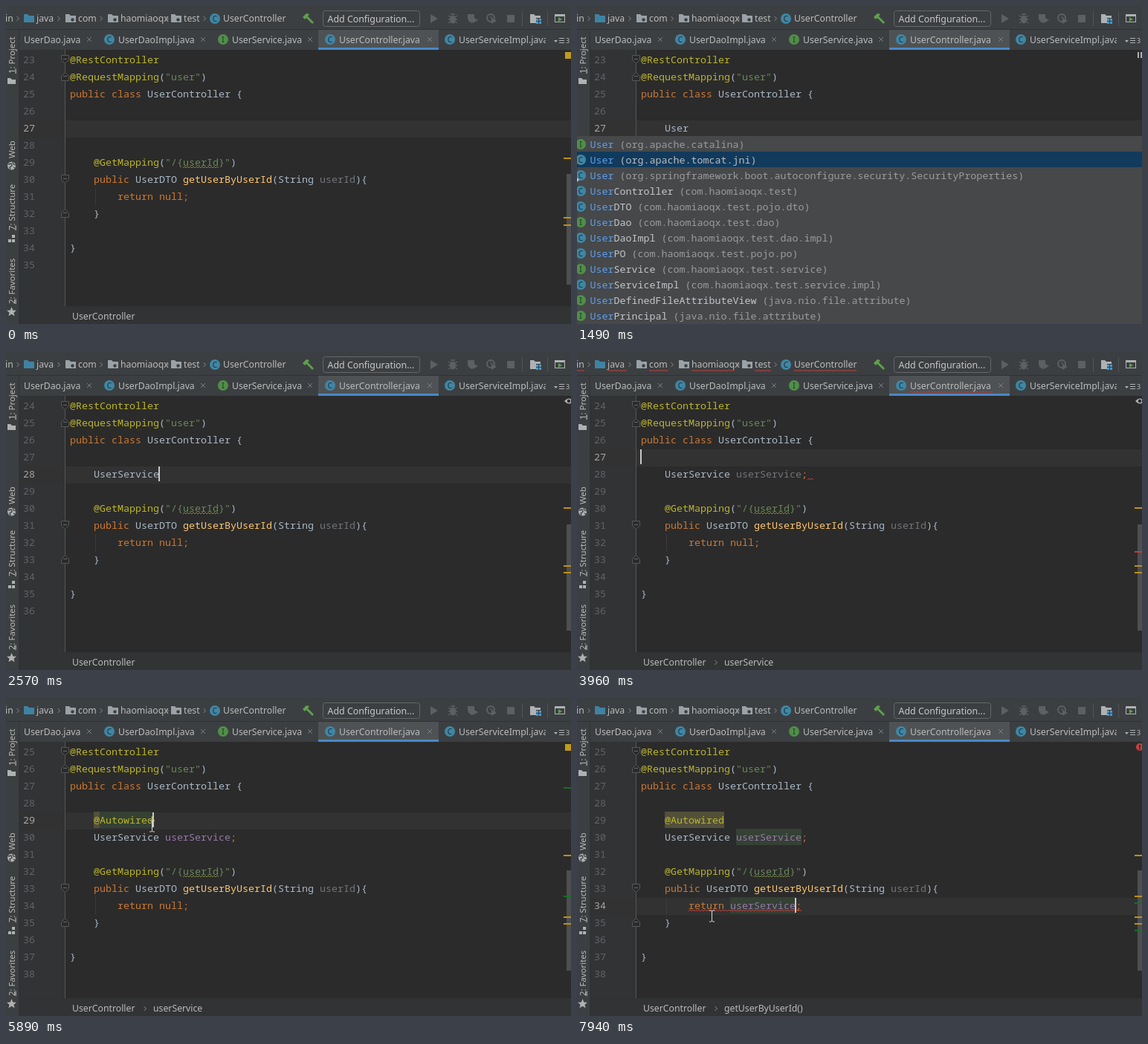
An HTML page that plays this animation: 760 px wide and 428 px high, repeating every 8000 ms.

```html
<!DOCTYPE html>
<html lang="en">
<head>
<meta charset="utf-8">
<title>Code editor</title>
<style>
html, body { margin: 0; width: 100%; height: 100%; overflow: hidden; background: #2b2b2b; }
svg { display: block; width: 760px; height: 428px; }
text { white-space: pre; }
.code { font: 13.33px "Noto Sans Mono", "DejaVu Sans Mono", monospace; }
.ui { font: 12.25px "Noto Sans", "Open Sans", sans-serif; }
</style>
</head>
<body>
<svg viewBox="0 0 760 428" xmlns="http://www.w3.org/2000/svg">
  <g id="editor"></g>
  <g id="chrome"></g>
  <g id="overlay"></g>
  <path id="mouse" d="M-3.5-7.5h2.5l1 1 1-1h2.5M0-6.5v13M-3.5 7.5h2.5l1-1 1 1h2.5" fill="none" stroke="#d8d8d8"/>
</svg>
<script>
const LOOP = 8000, CH = 8, ROW = 23, LEFT = 86, TOP = 61;
const C = {
  bar: '#3c3f41', text: '#a9b7c6', ui: '#bbbbbb', key: '#cc7832', note: '#bbb529', str: '#6a8759',
  fn: '#ffc66d', field: '#9876aa', dim: '#72737a', red: '#bc3f3c', warn: '#be9117', use: '#1c6b2b',
  usage: '#344134', ochre: '#52503a', pick: '#214283'
};
const $ = id => document.getElementById(id);

const rect = (x, y, w, h, fill, more = '') => `<rect x="${x}" y="${y}" width="${w}" height="${h}" fill="${fill}" ${more}/>`;
const shape = (d, fill, more = '') => `<path d="${d}" fill="${fill}" ${more}/>`;
const line = (d, color, w = 1) => shape(d, 'none', `stroke="${color}" stroke-width="${w}"`);
const label = (x, y, s, fill = C.ui, more = '') => `<text class="ui" x="${x}" y="${y}" fill="${fill}" ${more}>${s}</text>`;
const mono = (x, y, s, fill) => `<text class="code" x="${x}" y="${y}" fill="${fill}">${s}</text>`;
const wave = (x1, x2, y, color) => {
  let d = `M${x1} ${y}`;
  for (let x = x1, up = true; x + 2 <= x2; x += 2, up = !up) d += up ? 'l2-2' : 'l2 2';
  return line(d, color);
};
const badge = (x, y, letter) => `<circle cx="${x}" cy="${y}" r="7" fill="${letter === 'C' ? '#3f86a5' : '#4f8f47'}"/>` +
  `<text x="${x}" y="${y + 3.5}" text-anchor="middle" font-family="Noto Sans, sans-serif" font-size="10" fill="#1f2d33">${letter}</text>`;
const folder = (x, color, dot) => shape(`M${x} 11h5l2 2h7v9h-14z`, color) +
  (dot ? `<circle cx="${x + 9.5}" cy="18.5" r="2.2" fill="#3c3f41"/>` : '');
const chevron = (x, y) => line(`M${x - 1.5} ${y - 3}l3 3-3 3`, '#85888a');

// Fixed window parts

function toolbar() {
  const crumbs = [[41, 'java'], [97, 'com'], [154, 'haomiaoqx'], [239, 'test'], [292, 'UserController']];
  let s = rect(0, 0, 760, 59, C.bar) + rect(0, 31, 760, 1, '#323232') + label(-1, 21, 'in');
  crumbs.forEach(([x, t], i) => {
    s += label(x, 21, t);
    if (i < 4) s += folder(x - 17, i ? '#9aa2a8' : '#3e83a3', i);
  });
  s += [16, 71, 128, 217, 267].map(x => chevron(x, 17)).join('') + badge(281, 17, 'C');
  s += shape('M399 15l5-5 4 1-2 3 8 8-2 2-8-8-2 2z', '#5fa04e');
  s += rect(426.5, 6.5, 130, 21, C.bar, 'rx="3" stroke="#646769"');
  s += label(432.5, 22, 'Add Configuration...', '#c8c8c8', 'style="font-size:12.4px"');
  const off = '#5d6062';
  s += shape('M571 11l10 6-10 6z', off);
  s += `<ellipse cx="601" cy="18" rx="4" ry="5.5" fill="${off}"/>` + line('M595 13l3 2M595 18h12M595 23l3-2M607 13l-3 2M607 23l-3-2M598 11l6 0', off, 1.4);
  s += shape('M621 11h9v6l-3 6q-6-2-6-7z', off) + shape('M628 15l7 4-7 4z', off);
  s += `<circle cx="652" cy="16" r="5" fill="none" stroke="${off}" stroke-width="2"/>` + line('M652 13v3h3', off) + shape('M653 16l7 4-7 4z', off);
  s += rect(674, 12, 10, 10, off) + rect(694, 7, 1, 20, '#515456') + rect(728, 7, 1, 20, '#515456');
  s += shape('M705 11h5l2 2h7v3h-6v7h-8z', '#afb1b3');
  for (const [x, y] of [[713, 17], [717, 17], [713, 21], [717, 21]]) s += rect(x, y, 3, 3, '#4a9ad0');
  s += rect(738.5, 11.5, 13, 10, 'none', 'stroke="#afb1b3"') + rect(738, 11, 14, 3, '#afb1b3') + shape('M743 15l5 3-5 3z', '#5fa04e');
  return s;
}

function tabs() {
  const list = [[24, 'UserDao', '', 112], [151, 'UserDaoImpl', 'C', 265], [304, 'UserService', 'I', 409],
    [448, 'UserController', 'C', 570], [609, 'UserServiceImpl', 'C', 0]];
  let s = rect(420, 32, 162, 27, '#4e5254') + rect(420, 56, 162, 3, '#4a88c7');
  for (const [x, name, kind, close] of list) {
    s += label(x, 50, name + '.java');
    if (kind) s += badge(x - 12, 45, kind);
    if (close) s += line(`M${close - 3} 42l6 6m0-6l-6 6`, '#7a7d7f');
  }
  s += rect(726, 32, 34, 27, C.bar) + shape('M737 46h5l-2.5 3z', '#afb1b3') + line('M744 43.5h7M744 46.5h7M744 49.5h7', '#afb1b3');
  return s + label(753, 50, '3', C.ui, 'style="font-size:9px"');
}

function sidebar() {
  const side = (y, t) => `<text class="ui" transform="translate(11.5 ${y}) rotate(-90)" fill="#bbbbbb" style="font-size:11.4px">${
    t.includes(':') ? `<tspan text-decoration="underline">${t[0]}</tspan>${t.slice(1)}` : t}</text>`;
  let s = rect(0, 32, 17, 396, C.bar) + rect(17, 32, 1, 396, '#323232');
  s += side(91, '1: Project') + side(205, 'Web') + side(302, '7: Structure') + side(401, '2: Favorites');
  s += shape('M2 97h4l2 2h5v6h-11z', '#afb1b3');
  s += '<circle cx="7.5" cy="215" r="5.5" fill="#afb1b3"/>' + line('M3 213l4-1 1 3-3 2 1 3M9 210l1 3 3 1M10 217l2 1', '#3c3f41', 1.3);
  s += rect(8, 308, 4, 4, '#afb1b3') + rect(3, 314, 4, 4, '#afb1b3') + rect(8, 314, 4, 4, '#afb1b3');
  return s + shape('M7.5 405l1.8 4.4 4.7.3-3.6 3 1.2 4.6-4.1-2.5-4.1 2.5 1.2-4.6-3.6-3 4.7-.3z', '#afb1b3');
}

// Completion lists: icon, name, package, nested flag

const P = 'com.haomiaoqx.test', BOOT = 'org.springframework.boot.autoconfigure';
const types = [
  ['I', 'User', 'org.apache.catalina'], ['C', 'User', 'org.apache.tomcat.jni'],
  ['C', 'User', BOOT + '.security.SecurityProperties', true], ['C', 'UserController', P],
  ['C', 'UserDTO', P + '.pojo.dto'], ['I', 'UserDao', P + '.dao'], ['C', 'UserDaoImpl', P + '.dao.impl'],
  ['C', 'UserPO', P + '.pojo.po'], ['I', 'UserService', P + '.service'], ['C', 'UserServiceImpl', P + '.service.impl'],
  ['I', 'UserDefinedFileAttributeView', 'java.nio.file.attribute'], ['I', 'UserPrincipal', 'java.nio.file.attribute']
];
const notes = [
  ['Autowired', 'org.springframework.beans.factory.annotation'], ['AutoConfigureOrder', BOOT],
  ['AutoConfigurationPackage', BOOT], ['AutoConfigureAfter', BOOT], ['AutoConfigureBefore', BOOT],
  ['AutoLoad', 'com.alibaba.druid.filter'], ['EnableAutoConfiguration', BOOT], ['ImportAutoConfiguration', BOOT],
  ['JsonAutoDetect', 'com.fasterxml.jackson.annotation'], ['NoAutoStart', 'ch.qos.logback.core.joran.spi'],
  ['EnableAspectJAutoProxy', 'org.springframework.context.annotation'], ['Default', 'lombok.Builder', true]
].map(n => ['@', ...n]);
const names = [['', 'userService', ''], ['', 'service', '']];

function popup({ x, list, match, sel = 0 }) {
  let s = rect(x, 175, 760 - x, list.length * 21 + 2, '#46484a');
  list.forEach(([kind, name, pack, nested], i) => {
    const y = 186 + i * 21, tx = x + 27.5;
    if (i === sel) s += rect(x, y - 11, 760 - x, 21, sel ? '#113a5c' : '#55585a');
    if (kind) s += badge(x + 15, y, kind);
    if (nested) s += shape(`M${x + 10} ${y + 3}l3 3-3 3-3-3z`, '#c3c6c9');
    let from = name.indexOf(match);
    if (from < 0) from = name.toLowerCase().indexOf(match.toLowerCase());
    const to = from < 0 ? 0 : from + match.length;
    from = Math.max(from, 0);
    const part = (a, b, color) => a < b ? mono(tx + a * CH, y + 5, name.slice(a, b), color) : '';
    s += part(0, from, '#c3c6c9') + part(from, to, '#5c9ff0') + part(to, name.length, '#c3c6c9');
    if (pack) s += mono(tx + (name.length + 1) * CH, y + 5, `(${pack})`, i === sel && sel ? '#bbbdbf' : '#999c9e');
  });
  return s;
}

// Timeline: each step overrides part of the state

const at = (x, list, match, sel) => ({ x, list, match, sel });
const svc = '    UserService userService;';
const calm = [['warn', 210], ['warn', 288], ['warn', 297]];
const base = [['warn', 212], ['warn', 295], ['warn', 304]];
const used = [...base, ['warn', 267], ['use', 276]];
const steps = [
  [0, { top: 23, mid: [''], cur: 4, caret: -1, status: 'warn', bar: [226, 375], marks: [['warn', 205], ['warn', 285], ['warn', 295]],
    crumb: '', pop: null, errors: 0, field: C.dim, bgs: [], ret: 'null' }],
  [70, { mid: ['    U'], caret: 5, status: 'busy' }],
  [210, { pop: at(90, types, 'U') }],
  [350, { mid: ['    Us'], caret: 6, pop: at(-10, types, 'Us') }],
  [490, { mid: ['    Use'], caret: 7, pop: at(-10, types, 'Use') }],
  [620, { mid: ['    User'], caret: 8, pop: at(-10, types, 'User') }],
  [1490, { caret: -1, pop: at(-10, types, 'User', 1) }],
  [1630, { pop: at(-10, types, 'User', 3) }],
  [1760, { pop: at(-10, types, 'User', 5) }],
  [1890, { pop: at(-10, types, 'User', 7) }],
  [2230, { pop: at(-10, types, 'User', 8) }],
  [2570, { top: 24, mid: ['    UserService'], caret: 15, status: 'eye', bar: [232, 375], marks: calm, pop: null }],
  [2840, { mid: ['    UserService '], caret: 16 }],
  [3030, { errors: 1, marks: [...calm, ['red', 269]] }],
  [3360, { mid: ['    UserService u'], caret: 17, crumb: 'u', pop: at(186, names, 'u') }],
  [3620, { mid: ['    UserService userService'], caret: 27, crumb: 'userService', pop: null }],
  [3690, { mid: [svc], caret: 28 }],
  [3960, { cur: 3, caret: 0 }],
  [4160, { mid: ['', svc], cur: 4, caret: 4, crumb: '' }],
  [4230, { errors: 0, marks: calm }],
  [4570, { mid: ['    @', svc], caret: 5, status: 'busy' }],
  [4700, { pop: at(98, notes, '') }],
  [4970, { mid: ['    @A', svc], caret: 6, pop: at(98, notes, 'A') }],
  [5100, { mid: ['    @Au', svc], caret: 7, pop: at(98, notes, 'Au') }],
  [5430, { top: 25, mid: ['    @Autowired', svc], caret: 14, crumb: 'userService', pop: null, status: 'eye', bar: [232, 367], marks: base, field: C.field }],
  [5820, { status: 'warn', marks: [...base, ['use', 121], ['use', 267]], bgs: [[4, 4, 1, C.ochre], [4, 5, 9, C.usage]] }],
  [6810, { cur: 5, caret: 27, marks: used, bgs: [[4, 4, 10, C.ochre], [5, 16, 11, C.usage]] }],
  [6940, { bgs: [[4, 4, 10, C.ochre], [5, 16, 11, C.pick]] }],
  [7410, { cur: 9, caret: 19, crumb: 'getUserByUserId()', bgs: [[4, 4, 10, C.ochre]] }],
  [7540, { bgs: [[4, 4, 10, C.ochre], [9, 15, 4, C.pick]] }],
  [7680, { ret: 'userService', caret: 26, status: 'eye', bgs: [[4, 4, 10, C.ochre]] }],
  [7940, { status: 'red', errors: 2, marks: [...used, ['use', 313]], bgs: [[4, 4, 10, C.ochre], [5, 16, 11, C.usage], [9, 15, 11, C.usage]] }]
];
const states = [];
for (const [, patch] of steps) states.push({ ...states[states.length - 1], ...patch });

function ink(word, st, inBody) {
  if (word[0] === '@') return word.length > 4 ? C.note : C.text;
  if (word[0] === '"') return C.str;
  if (/^(public|class|return|null|;)$/.test(word)) return C.key;
  if (word === 'getUserByUserId') return C.fn;
  if (word === 'userService') return inBody ? C.field : st.field;
  return word === 'userId' ? C.dim : C.text;
}

function codeLine(src, y, st, inBody) {
  let s = '';
  for (const m of src.matchAll(/@\w+|"[^"]*"|\w+|\S/g)) s += mono(LEFT + m.index * CH, y + 16, m[0], ink(m[0], st, inBody));
  return s;
}

function fold(y, down) {
  const d = down ? 'M74.5 -5.5h10v6l-5 5-5-5z' : 'M74.5 5.5h10v-6l-5-5-5 5z';
  return `<g transform="translate(0 ${y + 11})">${shape(d, '#2b2b2b', 'stroke="#555759"')}${line('M77 -.5h5', '#666869')}</g>`;
}

function statusIcon(kind) {
  if (kind === 'warn') return rect(752, 62, 8, 9, '#c29a1b');
  if (kind === 'busy') return rect(754, 62, 2, 8, '#afb1b3') + rect(758, 62, 2, 8, '#afb1b3');
  if (kind === 'red') return '<circle cx="757" cy="66" r="5" fill="#c7413e"/>' + rect(756, 63, 2, 4, '#2b2b2b') + rect(756, 68, 2, 1.5, '#2b2b2b');
  return shape('M751 66q6-7 12 0q-6 7-12 0z', '#afb1b3') + '<circle cx="757" cy="66" r="2.2" fill="#2b2b2b"/>';
}

function editor(st) {
  const lines = ['@RestController', '@RequestMapping("user")', 'public class UserController {', '', ...st.mid, '',
    '    @GetMapping("/{userId}")', '    public UserDTO getUserByUserId(String userId){', `        return ${st.ret};`, '    }', '', '}', ''];
  const get = st.mid.length + 5, curY = TOP + st.cur * ROW;
  let s = rect(0, 59, 760, 369, '#2b2b2b') + rect(18, 59, 61, 346, '#313335') + rect(18, curY + 1, 742, ROW, '#323232');
  s += rect(79, 59, 1, 346, '#555555') + rect(754, st.bar[0], 6, st.bar[1] - st.bar[0], '#4d4f50');
  s += rect(120, TOP + (get + 2) * ROW, 1, ROW, '#3b3b3b');
  for (const [row, col, n, fill] of st.bgs) s += rect(LEFT + col * CH, TOP + row * ROW, n * CH, 22, fill);
  lines.forEach((src, i) => {
    const y = TOP + i * ROW;
    s += mono(23, y + 16, st.top + i, i === st.cur ? '#a4a3a3' : '#606366') + codeLine(src, y, st, i > get);
  });
  s += wave(238, 286, TOP + get * ROW + 19, '#7d8440');
  s += fold(TOP, true) + fold(TOP + ROW, false) + fold(TOP + (get + 1) * ROW, true) + fold(TOP + (get + 3) * ROW, false);
  if (st.errors === 1) {
    const end = LEFT + st.mid[st.mid.length - 1].length * CH;
    s += wave(end, end + 8, 172, C.red);
  }
  if (st.errors === 2) s += wave(150, 302, 287, C.red);
  if (st.caret >= 0) s += rect(LEFT + st.caret * CH - 1, curY + 1, 2, 20, '#c8c8c8');
  for (const [kind, y] of st.marks) s += rect(750, y - 1, 10, 2, C[kind]);
  s += statusIcon(st.status);
  s += rect(18, 405, 742, 23, '#313335') + rect(18, 404, 742, 1, '#2f3133') + label(89, 422, 'UserController');
  if (st.crumb) s += chevron(187, 418) + label(198, 422, st.crumb);
  return s;
}

function overlay(st) {
  let s = '';
  if (st.errors === 1) {
    for (const [a, b] of [[0, 10], [41, 67], [97, 123], [154, 212], [239, 261], [292, 377]]) s += wave(a, b, 26, C.red);
    s += wave(448, 560, 55, C.red);
  }
  return s + (st.pop ? popup(st.pop) : '');
}

// Pointer stops: time, x, y
const stops = [[5690, 198, 172], [5890, 198, 172], [5950, 75, 190], [6150, 75, 190], [6610, 320, 200], [6810, 290, 192],
  [7010, 262, 190], [7150, 262, 190], [7410, 230, 279], [7600, 230, 279], [7740, 181, 293], [8000, 181, 293]];

function pointer(t) {
  const i = stops.findIndex(p => p[0] > t);
  $('mouse').setAttribute('visibility', i > 0 ? 'visible' : 'hidden');
  if (i < 1) return;
  const [a, b] = [stops[i - 1], stops[i]], k = (t - a[0]) / (b[0] - a[0]);
  const mix = n => Math.round(a[n] + (b[n] - a[n]) * k);
  $('mouse').setAttribute('transform', `translate(${mix(1) + .5} ${mix(2) + .5})`);
}

let shown = -1;
function draw(t) {
  let i = steps.length - 1;
  while (steps[i][0] > t) i--;
  if (i !== shown) {
    shown = i;
    $('editor').innerHTML = editor(states[i]);
    $('overlay').innerHTML = overlay(states[i]);
  }
  pointer(t);
}

$('chrome').innerHTML = toolbar() + tabs() + sidebar();
const start = performance.now();
function tick() {
  draw((performance.now() - start) % LOOP);
  requestAnimationFrame(tick);
}
tick();
</script>
</body>
</html>
```
